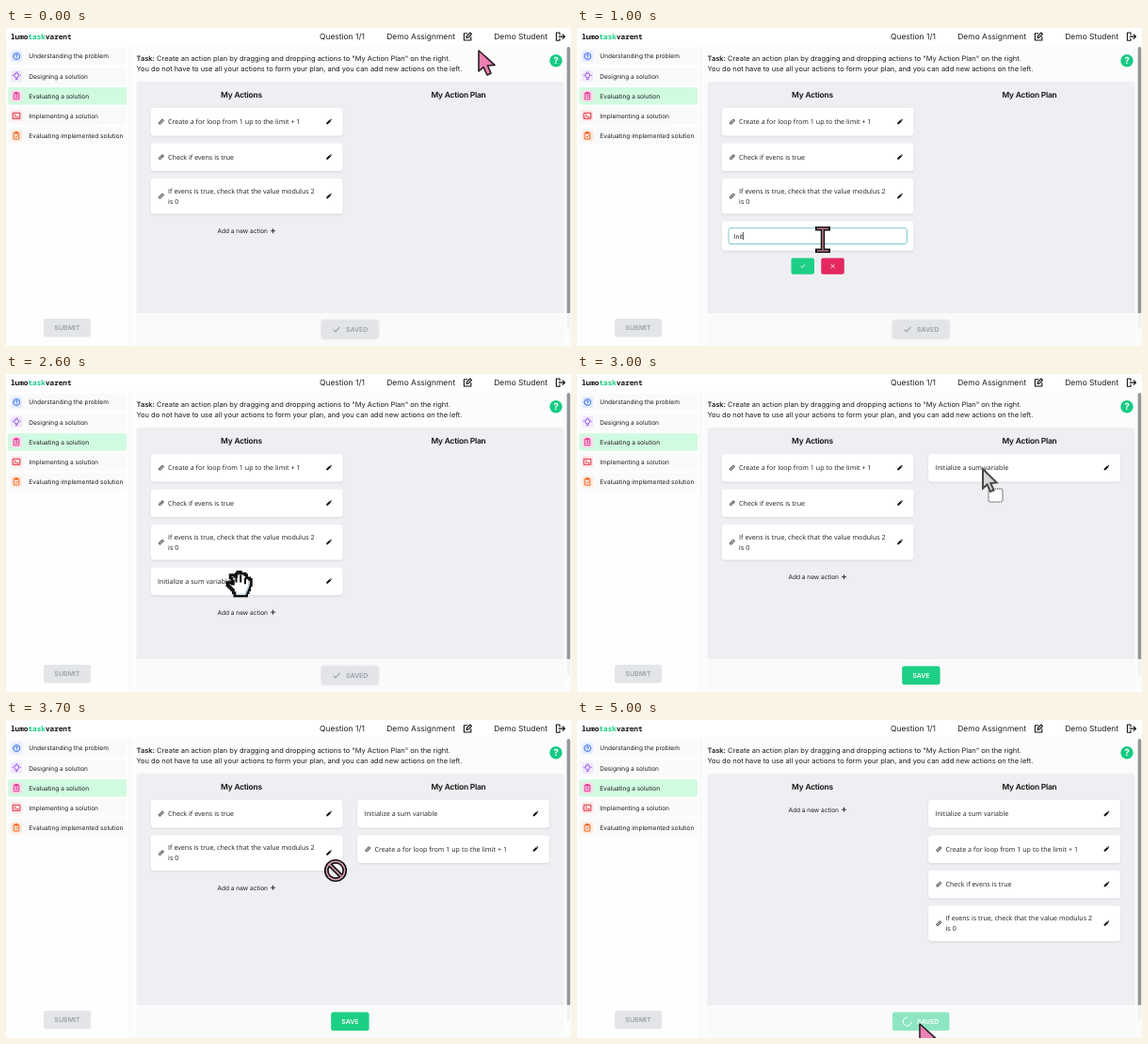
Recreate the animation shown at these times as an HTML page. Size 600 px wide and 338 px high, loop 5.1 s.

```html
<!DOCTYPE html>
<html lang="en">
<head>
<meta charset="utf-8">
<title>Action plan demo</title>
<style>
  html, body { margin: 0; width: 100%; height: 100%; overflow: hidden; background: #fff; }
  svg.stage { display: block; width: 600px; height: 338px; }
  text { font: 6.5625px Inter, sans-serif; fill: #1c1e22; white-space: pre; text-rendering: geometricPrecision; }
  .brand { font: 700 7.7px "Noto Sans Mono", monospace; fill: #111; }
  .brand tspan { fill: #18cd84; }
  .top { font-size: 8.44px; }
  .task { font-size: 7.48px; }
  .task tspan { font-weight: 600; }
  .head { font-size: 8.44px; font-weight: 600; letter-spacing: -.025em; text-anchor: middle; fill: #111; }
  .card text { font: 7.1px "Open Sans", "Noto Sans", sans-serif; word-spacing: .12px; }
  .btn { font-size: 7px; font-weight: 600; }
  .mid { text-anchor: middle; }
  .panel { fill: #eeeff2; }
  .box { fill: #fff; filter: drop-shadow(0 1.2px 1.3px #00000018); }
  .line { fill: none; stroke-linecap: round; stroke-linejoin: round; }
</style>
</head>
<body>
<svg class="stage" viewBox="0 0 600 338">
  <defs>
    <g id="link" class="line" stroke="#222" stroke-width="1" transform="rotate(-45) scale(.88)">
      <path d="M-.6-1.3H-2a1.3 1.3 0 0 0 0 2.6H-.6M.6-1.3H2a1.3 1.3 0 0 1 0 2.6H.6M-1.4 0H1.4"/>
    </g>
    <path id="pencil" fill="#111" transform="scale(.85)" d="M-3 3V1.3L1-2.7 2.7-1-1.3 3ZM1.5-3.1 2-3.5Q2.4-3.7 2.8-3.4L3.4-2.8Q3.7-2.4 3.4-2L3-1.5Z"/>
    <g id="arrow">
      <path d="M0 0V22L5 17.6 9 26 13 24 9.4 16 17 15.4Z" fill="#ee7fb4" stroke="#2a2027" stroke-width="1.6" stroke-linejoin="round"/>
    </g>
    <g id="drag">
      <rect x="7" y="22" width="15" height="14" rx="2" fill="#fff" stroke="#555" stroke-width="1.1" stroke-dasharray="1.6 .7"/>
      <path d="M1 1V21.5L5.6 17.4 9 25 12.6 23.4 9.2 16 15.6 15.4Z" fill="#d6d6d6" stroke="#484848" stroke-width="2"/>
    </g>
    <g id="beam">
      <path d="M-8-14H8V-9.5H2.2V9.5H8V14H-8V9.5H-2.2V-9.5H-8Z" fill="#151315"/>
      <path d="M-6-11.8H6M0-11V11M-6 11.8H6" stroke="#d98a9d" stroke-width="1.3"/>
    </g>
    <g id="hand" transform="translate(-13 -12.5) scale(1.58)">
      <path d="M2 3V2H5V3H6V1H7V0H9V1H12V2H13V4H15V5H16V9H15V12H14V14H13V16H5V14H4V12H3V11H2V10H1V9H0V7H3V8H4V6H3V4H2Z" fill="#fff" stroke="#111" stroke-width="1.8"/>
      <path d="M14.5 6V9L13 13 12 15H6" fill="none" stroke="#c3d4e4" stroke-width="1"/>
      <path d="M6 3V7M9 2V7M12 4V8" stroke="#111" stroke-width="1.3"/>
    </g>
    <g id="no" fill="none">
      <g stroke="#151315" stroke-width="4.8"><circle r="9.7"/><path d="M-6.5-6.5 6.5 6.5"/></g>
      <g stroke="#dba3b3" stroke-width="1.5"><circle r="9.7"/><path d="M-6.8-6.8 6.8 6.8"/></g>
    </g>
  </defs>

  <rect width="600" height="338" fill="#fff"/>
  <rect y="18.5" width="131" height="320" fill="#fefefe"/>
  <rect x="131" y="18.5" width="469" height="320" fill="#fcfcfc"/>
  <path d="M131 18.5V338" stroke="#f0f0f1" stroke-width=".8"/>

  <text class="brand" x="5" y="11.7">lumo<tspan>task</tspan>varent</text>
  <text class="top" x="333" y="12">Question 1/1</text>
  <text class="top" x="404.3" y="12">Demo Assignment</text>
  <text class="top" x="518.3" y="12">Demo Student</text>
  <g class="line" stroke="#111" stroke-width="1.1">
    <path d="M489.8 5.7H486.4V13H493.8V9.6M489 10.4 489.3 8.6 492.9 5 494.4 6.5 490.8 10.1Z"/>
    <path d="M588 7V5H584.4V13.2H588V11.2M587.2 9.1H593.4M591.2 6.8 593.5 9.1 591.2 11.4"/>
  </g>

  <g id="menu"></g>
  <rect x="40" y="309" width="50" height="19.5" rx="2.5" fill="#e3e5e8"/>
  <text class="btn mid" x="65" y="321.3" style="fill:#9ca2ab">SUBMIT</text>

  <text class="task" x="138.6" y="34.7"><tspan>Task:</tspan> Create an action plan by dragging and dropping actions to "My Action Plan" on the right.</text>
  <text class="task" x="138.6" y="46.2">You do not have to use all your actions to form your plan, and you can add new actions on the left.</text>
  <circle cx="584" cy="34.7" r="6.7" fill="#14cb82"/>
  <text class="mid" x="584" y="38.3" style="font-size:10px;font-weight:700;fill:#fff">?</text>

  <path class="panel" d="M138.5 338V60.5Q138.5 57 142 57H589Q592.5 57 592.5 60.5V338Z"/>
  <text class="head" x="250" y="73.6">My Actions</text>
  <text class="head" x="480.5" y="73.6">My Action Plan</text>
  <rect x="595.6" y="20" width="3.6" height="300" rx="1.8" fill="#969799"/>
  <rect x="131" y="303" width="469" height="35" fill="#fcfcfc" opacity=".9"/>

  <g id="lists"></g>
  <g id="save"></g>
  <use id="cursor"/>
</svg>

<script>
const LOOP = 5100, STEP = 100;
const LEFT = 153.8, RIGHT = 373.2, TOP = 85, GAP = 8;
const PHRASE = "Initialize a sum variable";
const $ = id => document.getElementById(id);

const CARDS = [
  { lines: ["Create a for loop from 1 up to the limit + 1"], link: true },
  { lines: ["Check if evens is true"], link: true },
  { lines: ["If evens is true, check that the value modulus 2", "is 0"], link: true },
  { lines: [PHRASE], link: false }
];

// time, cards on the left, cards in the plan
const ORDER = [
  [0, "012", ""], [2500, "0123", ""], [3000, "012", "3"], [3200, "102", "3"], [3400, "12", "30"],
  [3800, "1", "302"], [4200, "", "3021"], [4300, "", "3012"]
];

// time, pointer shape, x, y
const PATH = [
  [0, "arrow", 502, 24], [100, "arrow", 502, 24], [600, "arrow", 256, 213],
  [700, "beam", 261, 225], [2200, "beam", 261, 225], [2300, "arrow", 250, 240], [2400, "arrow", 240, 250],
  [2600, "hand", 248, 223], [2700, "drag", 262, 212], [2800, "no", 310, 170], [3000, "drag", 430, 100],
  [3100, "hand", 380, 105], [3200, "drag", 290, 130], [3300, "no", 388, 150], [3400, "drag", 430, 140],
  [3500, "arrow", 340, 140], [3600, "hand", 265, 138], [3700, "no", 350, 160], [3800, "drag", 425, 180],
  [3900, "arrow", 340, 130], [4000, "hand", 260, 98], [4100, "no", 350, 160], [4200, "drag", 426, 203],
  [4300, "hand", 424, 180], [4600, "hand", 424, 180], [4700, "arrow", 410, 220], [5000, "arrow", 364, 323]
];

// time, letters typed
const TYPING = [[800, 0], [1000, 4], [1300, 6], [1900, 25]];

const lastIndex = (keys, t) => Math.max(0, keys.findLastIndex(k => k[0] <= t));

function between(keys, t, col) {
  const i = lastIndex(keys, t), a = keys[i], b = keys[i + 1];
  if (!b) return a[col];
  const p = Math.max(0, (t - a[0]) / (b[0] - a[0]));
  return a[col] + (b[col] - a[col]) * p;
}

const rect = (x, y, w, h, r, attrs) => `<rect x="${x}" y="${y}" width="${w}" height="${h}" rx="${r}" ${attrs}/>`;
const stroke = (d, color, width) => `<path class="line" d="${d}" stroke="${color}" stroke-width="${width}"/>`;

function drawMenu() {
  const clip = "M-2.6-3H2.6V3.6H-2.6ZM-1-3.8H1V-2.2H-1Z";
  const items = [
    ["Understanding the problem", "#3c6ff0", "#e4edfe", "M-3.5 0A3.5 3.5 0 1 1 3.5 0A3.5 3.5 0 1 1-3.5 0M-1.1-.9Q-1-2 0-2T1.1-.9Q1.1-.2 0 .5M0 1.9V2"],
    ["Designing a solution", "#8a45dc", "#f1e8fd", "M-1.2 1.6Q-2.4.5-2.4-.9A2.4 2.4 0 0 1 2.4-.9Q2.4.5 1.2 1.6ZM-.9 3.2H.9M0-4.2V-4.4M-4 -.8H-4.2M4-.8H4.2"],
    ["Evaluating a solution", "#dc2f8d", "#fbdcec", clip + "M-1.1-.4H1.1M-1.1 1.4H1.1"],
    ["Implementing a solution", "#df2f42", "#fde5e6", "M-3.6-3H3.6V3H-3.6ZM-2-1.2-.7 0-2 1.2M.3 1.4H1.8"],
    ["Evaluating implemented solution", "#ee6425", "#feeadd", clip + "M-1.2.6-.3 1.5 1.3-.4"]
  ];
  $("menu").innerHTML = items.map(([label, color, tint, icon], i) => {
    const y = 30 + 21.1 * i;
    return rect(2, y - 9.3, 126.3, 18.6, 2.5, `fill="${i === 2 ? "#d1fbe0" : "#fafafb"}"`) +
      rect(5.2, y - 6, 12, 12, 2, `fill="${tint}"`) +
      `<g transform="translate(11.2 ${y})">${stroke(icon, color, 1)}</g>` +
      `<text x="24.3" y="${y + 2.4}">${label}</text>`;
  }).join("");
}

const cardHeight = card => card.lines.length > 1 ? 37.5 : 29.5;

function cardMarkup(card, x, y) {
  const mid = cardHeight(card) / 2;
  const first = mid + 2.6 - (card.lines.length - 1) * 5.625;
  const lines = card.lines.map((s, i) => `<text x="${card.link ? 18.3 : 7.3}" y="${first + i * 11.25}">${s}</text>`);
  return `<g class="card" transform="translate(${x} ${y})">${rect(0, 0, 203.8, mid * 2, 3.5, 'class="box"')}` +
    (card.link ? `<g transform="translate(11 ${mid})"><use href="#link"/></g>` : "") +
    `${lines.join("")}<use href="#pencil" x="189" y="${mid}"/></g>`;
}

// Stacks cards and returns the markup with the next free y
function column(ids, x) {
  let y = TOP, html = "";
  for (const id of ids) {
    html += cardMarkup(CARDS[id], x, y);
    y += cardHeight(CARDS[id]) + GAP;
  }
  return { html, y };
}

function addButton(y, hover) {
  return (hover ? rect(219, y, 73.5, 20.3, 2.5, 'fill="#e0e1e5"') : "") +
    `<text x="224.4" y="${y + 12.5}">Add a new action</text>` +
    stroke(`M281.4 ${y + 10.2}H285.6M283.5 ${y + 8.1}V${y + 12.3}`, "#1c1e22", .9);
}

function form(y, typed) {
  return rect(LEFT, y, 203.8, 31, 3.5, 'class="box"') +
    rect(161, y + 7.2, 189.4, 16.8, 2, 'fill="#fff" stroke="#70c4cf" stroke-width=".9"') +
    `<text id="typed" x="166.8" y="${y + 18}">${typed}</text>` +
    rect(0, y + 11.5, .7, 8.2, 0, 'id="caret" fill="#111"') +
    rect(227.5, y + 39, 24.5, 17.3, 2, 'fill="#1dcf84"') +
    rect(259.3, y + 39, 24.5, 17.3, 2, 'fill="#e4285f"') +
    stroke(`M237.8 ${y + 47.8}l1.4 1.4 2.8-3.2`, "#fff", .9) +
    stroke(`M269.9 ${y + 46}l3.3 3.3m0-3.3l-3.3 3.3`, "#fff", .9);
}

function saveBar(t) {
  const label = (x, s, color) => `<text class="btn mid" x="${x}" y="323.3" style="fill:${color}">${s}</text>`;
  if (t >= 3000 && t < 5000)
    return rect(345.2, 310.6, 40.4, 19.6, 2.5, 'fill="#1ccf84"') + label(365.4, "SAVE", "#fff");
  if (t >= 5000)
    return rect(335, 310.6, 60.5, 19.6, 2.5, 'fill="#8de6c1"') +
      `<circle cx="350.7" cy="320.6" r="4.4" fill="none" stroke="#fff" stroke-width="1" stroke-dasharray="21 6.6"/>` +
      label(372.7, "SAVED", "#fff");
  return rect(335, 310.6, 60.5, 19.6, 2.5, 'fill="#e2e4e8" style="filter:drop-shadow(0 .6px 1px #0002)"') +
    stroke("M348 320.8l2 2 4.2-4.6", "#9aa0aa", 1.1) + label(372.7, "SAVED", "#9aa0aa");
}

function draw(t) {
  const [, left, plan] = ORDER[lastIndex(ORDER, t)];
  const actions = column(left, LEFT);
  const editing = t >= 700 && t < 2500;
  const hover = (t >= 500 && t < 700) || t === 4200;
  const typed = PHRASE.slice(0, Math.round(between(TYPING, t, 1)));

  $("lists").innerHTML = actions.html + column(plan, RIGHT).html +
    (editing ? form(actions.y, typed) : addButton(actions.y, hover));
  if (editing) $("caret").setAttribute("x", 167 + $("typed").getComputedTextLength());

  $("save").innerHTML = saveBar(t);
  $("cursor").setAttribute("href", "#" + PATH[lastIndex(PATH, t)][1]);
  $("cursor").setAttribute("transform", `translate(${between(PATH, t, 2)} ${between(PATH, t, 3)})`);
}

let shown = -1;
function tick() {
  const t = Math.floor(performance.now() % LOOP / STEP) * STEP;
  if (t !== shown) draw(shown = t);
  requestAnimationFrame(tick);
}

drawMenu();
tick();
</script>
</body>
</html>
```
